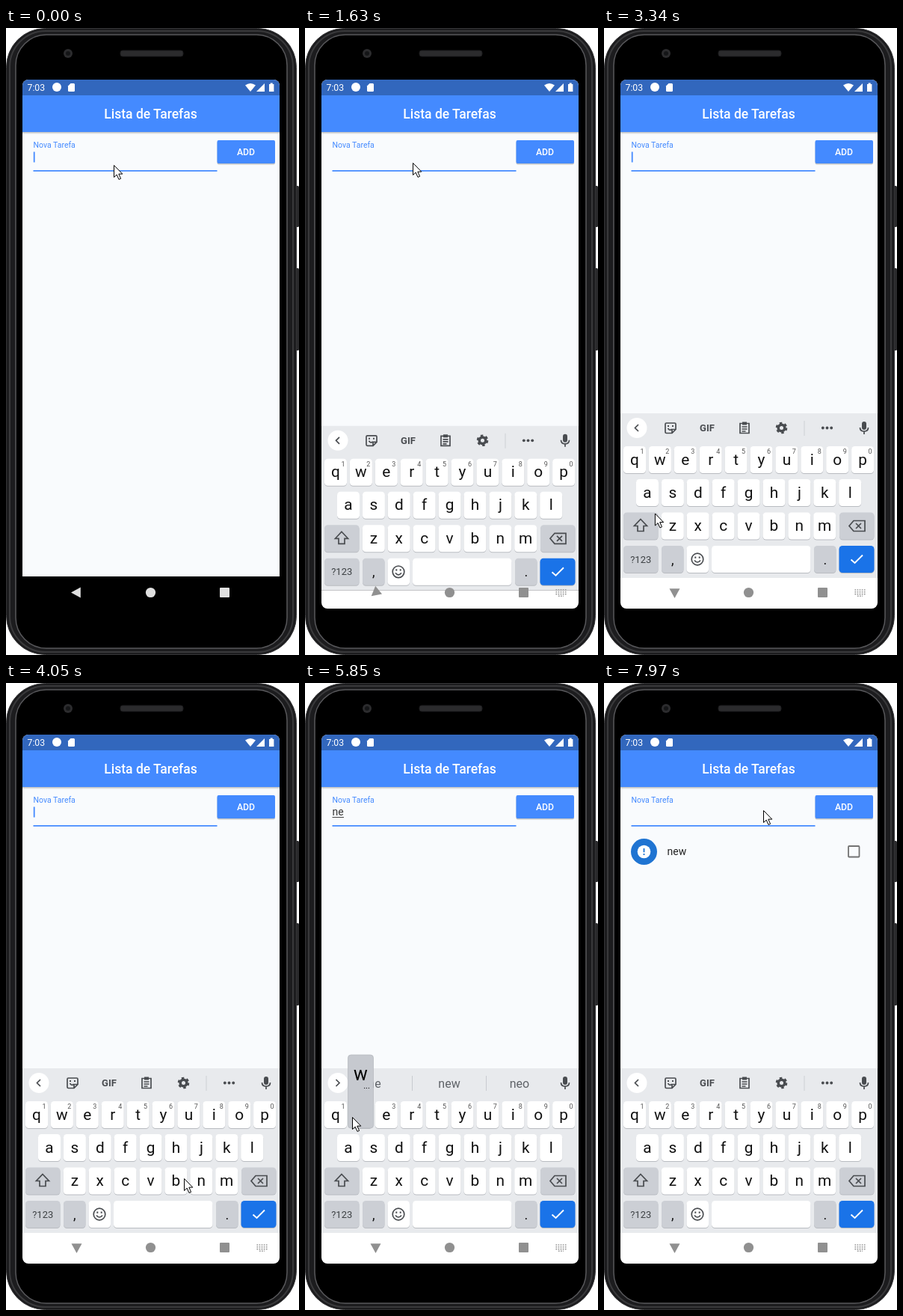
Recreate the animation shown at these times as an HTML page. Size 392 by 838 pixels, loop 8000 ms.

```html
<!DOCTYPE html>
<html lang="pt">
<head>
<meta charset="utf-8">
<title>Lista de Tarefas</title>
<style>
html, body { margin: 0; width: 100%; height: 100%; overflow: hidden; background: #fff; }
svg { display: block; width: 392px; height: 838px; font-family: Roboto, sans-serif; }
.mid { text-anchor: middle; }
.bold { font-weight: 500; }
.line { fill: none; stroke: #494c50; stroke-width: 1.7; }
.sug text { font-size: 16px; fill: #5f6368; text-anchor: middle; }
</style>
</head>
<body>
<svg viewBox="0 0 392 838">
  <defs>
    <linearGradient id="fade" x2="0" y2="1">
      <stop offset="0" stop-color="#000" stop-opacity=".25"/><stop offset="1" stop-color="#000" stop-opacity="0"/>
    </linearGradient>
    <clipPath id="screen"><rect x="22" y="69" width="344" height="707" rx="8"/></clipPath>
    <clipPath id="button"><rect x="282.500" y="150" width="77.500" height="31" rx="2"/></clipPath>
  </defs>

  <!-- phone -->
  <g fill="#2a2a2c">
    <rect x="386" y="211" width="6" height="55" rx="1.500"/>
    <rect x="386" y="321" width="6" height="110" rx="1.500"/>
  </g>
  <rect x=".5" y=".5" width="388" height="837" rx="52" fill="#1c1c1e" stroke="#333335"/>
  <rect x="5" y="4" width="379" height="830" rx="48" fill="none" stroke="#39393b" stroke-width="2"/>
  <rect x="13" y="9" width="363" height="820" rx="41" stroke="#58585b" stroke-width="1.500"/>
  <circle cx="83" cy="34" r="6" fill="#2c2c2e"/><circle cx="83" cy="34" r="3" fill="#151618"/>
  <rect x="153" y="30" width="84" height="8" rx="3" fill="#2b2b2d" stroke="#1b1b1c"/>

  <g clip-path="url(#screen)">
    <path d="M22 69h344v664H22z" fill="#f9fbfd"/>
    <path d="M22 139h344v3H22z" fill="url(#fade)"/>
    <path d="M22 90h344v49H22z" fill="#448aff"/>
    <path d="M22 69h344v21H22z" fill="#3267bd"/>
    <g fill="#fff">
      <text x="28.500" y="84" font-size="12.250">7:03</text>
      <circle cx="68" cy="79" r="6"/>
      <path d="M86.500 74h4q1.500 0 1.500 1.500v8q0 1.500-1.500 1.500h-6q-1.500 0-1.500-1.500v-6z"/>
      <path d="M320 76.500q7-5 14 0l-7 8.500z"/>
      <path d="M346 74v11h-11z"/>
      <path d="M352 75h1.700v-1.500h3V75h1.700v10H352z"/>
      <text class="mid bold" x="193.500" y="121" font-size="17.500">Lista de Tarefas</text>
    </g>
    <text x="36.500" y="160" font-size="10.500" fill="#448aff">Nova Tarefa</text>
    <path d="M36.500 190.900h246" stroke="#448aff" stroke-width="1.750"/>
    <text id="field" x="36.500" y="177" font-size="14" fill="#333"></text>
    <path id="under" stroke="#444" stroke-width="1"/>
    <rect id="caret" y="165.500" width="1.800" height="14" fill="#448aff"/>

    <rect x="282.500" y="151.500" width="77.500" height="31" rx="2" fill="#000" opacity=".22"/>
    <rect x="282.500" y="150" width="77.500" height="31" rx="2" fill="#448aff"/>
    <g clip-path="url(#button)"><circle id="ripple" cx="337" cy="165" fill="#fff"/></g>
    <text class="mid bold" x="321" y="170" font-size="12.250" fill="#fff">ADD</text>

    <g id="item">
      <circle cx="53.500" cy="225.500" r="17.500" fill="#1f74d2"/>
      <circle cx="53.500" cy="225.500" r="8.800" fill="#fff"/>
      <path d="M53.500 221v5.300m0 1.800v1.800" stroke="#1f74d2" stroke-width="1.800"/>
      <text x="84.500" y="230" font-size="14" fill="#222">new</text>
      <rect x="327" y="218" width="14.500" height="14.500" rx="1" fill="none" stroke="#737373" stroke-width="1.800"/>
    </g>

    <g id="board">
      <path d="M22 515h344v220H22z" fill="#e8eaed"/>
      <path d="M22 735h344v41H22z" fill="#fff"/>
      <circle cx="44" cy="534.500" r="13.500" fill="#fff"/>
      <path id="chevron" class="line"/>
      <g id="tools" fill="#494c50">
        <path class="line" d="M83.500 528h11q1.500 0 1.500 1.500v7l-5 5h-7.500q-1.500 0-1.500-1.500v-10.500q0-1.500 1.500-1.500zM96 536.500h-5v5M85.500 535q2.500 4 5 1"/>
        <path d="M85 531h2v2h-2zm6 0h2v2h-2z"/>
        <text class="mid" x="138" y="539" font-size="13" font-weight="700">GIF</text>
        <path class="line" d="M182 528.500h12v13h-12zM184.500 533h7m-7 3h7m-7 3h5"/>
        <path d="M185 526.500h6v4h-6z"/>
        <circle cx="237.500" cy="534.500" r="4.300" fill="none" stroke="#494c50" stroke-width="3.600"/>
        <circle cx="237.500" cy="534.500" r="6.500" fill="none" stroke="#494c50" stroke-width="2.600" stroke-dasharray="3.400 3.407"/>
        <path d="M268 525v20" stroke="#cdd0d4"/>
        <circle cx="292.800" cy="534.500" r="1.900"/><circle cx="298.500" cy="534.500" r="1.900"/><circle cx="304.200" cy="534.500" r="1.900"/>
      </g>
      <g id="sug" class="sug">
        <path d="M143.500 525v20m99-20v20" stroke="#c8cbd0"/>
        <text x="93" y="541"></text><text x="193" y="541"></text><text x="287" y="541"></text>
      </g>
      <rect x="345" y="526" width="6" height="11" rx="3" fill="#494c50"/>
      <path class="line" d="M342.500 534q0 5 5.500 5t5.500-5M348 539v4"/>
      <g id="keys"></g>
      <path class="line" d="M49 656.500l8.500 9h-4.500v7h-8v-7h-4.500z"/>
      <path class="line" d="M334 658.500h15v14h-15l-6-7zM337 662l7 7m0-7l-7 7"/>
      <circle class="line" cx="125" cy="710" r="7.800"/>
      <path class="line" d="M121 711.500q4 5 8 0"/>
      <path d="M121.300 706.500h2v2.200h-2zm5.400 0h2v2.200h-2z" fill="#494c50"/>
      <path d="M330.500 710.500l5 4.500 10.500-10.500" fill="none" stroke="#fff" stroke-width="1.900"/>
    </g>

    <g id="nav">
      <path id="back" d="M87 754.500L99.800 747.500v14z"/>
      <circle cx="193.500" cy="754.500" r="6.600"/>
      <rect x="286" y="748" width="13" height="13" rx="1"/>
    </g>
    <path id="mini" d="M335.500 751h14m-14 2.800h14m-14 2.800h14M339 759.200h7" stroke="#929292" stroke-width="1.600" stroke-dasharray="1.600 1.500"/>
  </g>

  <g id="pop">
    <rect x="-17" y="-80" width="34" height="98" rx="4" fill="#c6c9cf" stroke="#b4b7bc" stroke-width=".7"/>
    <text class="mid" y="-46" font-size="25"></text>
    <text class="mid" x="8" y="-35" font-size="11">...</text>
  </g>
  <circle id="spot" r="12" fill="#e6de3c" opacity=".88"/>
  <path id="mouse" d="M.5 .5v16l3.700-3.400 2.800 6.300 2.600-1.100-2.800-6.200h5z" fill="#fff" stroke="#000"/>
</svg>
<script>
const $ = id => document.getElementById(id);
const show = (id, on) => $(id).style.display = on ? '' : 'none';
const set = (id, name, v) => $(id).setAttribute(name, v);
const clamp = v => Math.max(0, Math.min(1, v));
const span = (t, a, b) => clamp((t - a) / (b - a));
const inside = (t, [a, b]) => t >= a && t < b;

// cubic-bezier(.4, 0, .2, 1)
function ease(x) {
  let a = 0, b = 1, u;
  for (let i = 0; i < 20; i++) {
    u = (a + b) / 2;
    const v = 1 - u;
    if (1.2 * v * v * u + .6 * v * u * u + u ** 3 < x) a = u; else b = u;
  }
  return u * u * (3 - 2 * u);
}

// keyboard layout
const grey = '#cccfd5';
let html = '';
function key(x, y, w, label = '', fill = '#fff', size = 20.8, hint = '') {
  const h = 36, mid = x + w / 2;
  html += `<rect x="${x}" y="${y + 1}" width="${w}" height="${h}" rx="4.500" fill="#b9bcc1"/>
    <rect x="${x}" y="${y}" width="${w}" height="${h}" rx="4.500" fill="${fill}"/>
    <text class="mid" x="${mid}" y="${y + (size < 16 ? 22.5 : 24.5)}" font-size="${size}" fill="${size < 16 ? '#3c4043' : '#111'}">${label}</text>
    <text class="mid" x="${mid + 10}" y="${y + 10}" font-size="9" fill="#555">${hint}</text>`;
}
[['qwertyuiop', 26, 559], ['asdfghjkl', 43, 603], ['zxcvbnm', 76.8, 647.5]].forEach(([row, x, y], r) =>
  [...row].forEach((c, i) => key(x + i * 33.9, y, 30, c, '#fff', 20.8, r ? '' : (i + 1) % 10)));
key(26, 647.5, 46.5, '', grey);
key(315, 647.5, 46.5, '', grey);
key(26, 692, 46.5, '?123', grey, 13);
key(77, 692, 29.5, ',', grey, 18);
key(110.5, 692, 29.5);
key(144, 692, 132.5);
key(281, 692, 29.5, '.', grey, 18);
key(314.5, 692, 47, '', '#1a73e8');
$('keys').innerHTML = html;

// pointer: time, x, y
const path = [
  [0, 144, 183], [384, 144, 182], [462, 144, 180], [2412, 144, 180], [2490, 131, 269.5],
  [2802, 35, 647], [2880, 35, 647], [3180, 49, 647], [3270, 49, 647], [4050, 238, 662],
  [4128, 250, 663], [4440, 250, 663], [4986, 116, 585], [5220, 116, 585], [5532, 63, 580],
  [5844, 63, 580], [6156, 371, 153], [6234, 371, 153], [6468, 337, 165], [6780, 337, 165],
  [7092, 326, 356], [7248, 326, 356], [7950, 213, 170], [8000, 213, 170]
];
const clicks = [[1140, 1310], [4200, 4370], [5060, 5220], [5680, 5840], [6460, 6630]];
const pops = [['n', 4250, 4400, 261, 666], ['e', 5100, 5300, 108, 577], ['w', 5740, 5860, 74.5, 577]];
const typed = [[4360, 'n', 36.5 + 8], [5300, 'ne', 36.5 + 15.5], [5860, 'new', 36.5 + 26]];
const words = { n: ['n', 'no', 'not'], ne: ['ne', 'new', 'neo'], new: ['new', 'news', 'next'] };
const blinks = [[0, 420], [910, 1410], [1930, 2470], [2950, 3440], [3950, 4860], [5300, 5800], [5860, 6360], [6900, 7440]];
const pressed = 6500, cleared = 6640, added = 6860;

function pointer(t) {
  const i = path.findIndex(p => p[0] > t), [a, x, y] = path[i - 1], [b, u, v] = path[i];
  const k = span(t, a, b);
  return [x + (u - x) * k, y + (v - y) * k];
}

function draw(t) {
  const at = `translate(${pointer(t)})`;
  set('mouse', 'transform', at);
  set('spot', 'transform', at);
  show('spot', clicks.some(c => inside(t, c)));

  // keyboard and navigation bar
  const up = 1 - ease(span(t, 1434, 1719));
  set('board', 'transform', `translate(0 ${261 * up})`);
  const shade = Math.round(224 - 80 * span(t, 1434, 1630));
  set('nav', 'fill', `rgb(${shade},${shade},${shade})`);
  set('back', 'transform', `rotate(${-90 * span(t, 1510, 1790)} 94.5 754.5)`);
  show('board', up < 1);
  show('mini', t >= 1550);

  // input
  const now = t >= added ? null : typed.filter(e => e[0] <= t).pop();
  const end = now ? now[2] : 36.5;
  $('field').textContent = now ? now[1] : '';
  set('under', 'd', now ? `M36.500 179.500H${end}` : '');
  set('caret', 'x', now ? end + .3 : 36.8);
  show('caret', blinks.some(b => inside(t, b)));
  show('item', t >= added);

  const hints = now && t < cleared;
  show('tools', !hints);
  show('sug', hints);
  set('chevron', 'd', hints ? 'M41.500 530l4.500 4.500-4.500 4.500' : 'M46 530l-4.500 4.500 4.500 4.500');
  if (hints) document.querySelectorAll('#sug text').forEach((e, i) => e.textContent = words[now[1]][i]);

  const pop = pops.find(p => inside(t, [p[1], p[2]]));
  show('pop', pop);
  if (pop) {
    set('pop', 'transform', `translate(${pop[3]} ${pop[4]})`);
    document.querySelector('#pop text').textContent = pop[0];
  }

  set('ripple', 'r', 60 * span(t, pressed, pressed + 180));
  set('ripple', 'opacity', .24 * (1 - span(t, pressed + 80, pressed + 190)));
}

// the screen refreshes every 78 ms
const tick = t => Math.max(0, 72 + 78 * Math.floor((t - 52) / 78));
const start = performance.now();
function loop() {
  draw(tick(Math.max(0, performance.now() - start) % 8000));
  requestAnimationFrame(loop);
}
loop();
</script>
</body>
</html>
```
